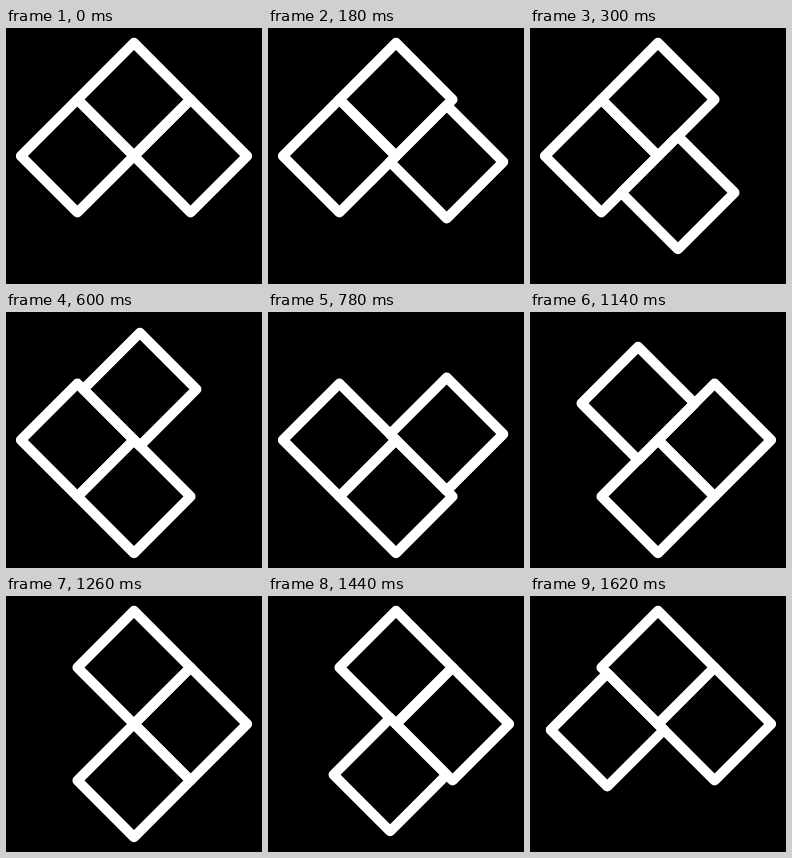
Write an HTML page with a canvas that moves like this. It is 256 px wide and 256 px high and loops after 1.68 s.

```html
<!DOCTYPE html>
<html lang="en">
<head>
<meta charset="utf-8">
<title>Sliding squares</title>
<style>
  html, body { margin: 0; width: 100%; height: 100%; overflow: hidden; background: #000; }
  canvas { display: block; width: 256px; height: 256px; }
</style>
</head>
<body>
<canvas id="stage" width="256" height="256"></canvas>
<script>
const ctx = document.getElementById('stage').getContext('2d');

const SIDE = 80;
const LOOP = 1680;   // ms
const STEP = 60;
const PHASE = 420;   // one square moves per phase
const REST = 120;    // pause before each move
const MOVE = 300;

// Slots on a 2x2 grid, which is turned by 45 degrees when drawn
const TOP = [-1, -1], RIGHT = [0, -1], BOTTOM = [0, 0], LEFT = [-1, 0];

// Each phase: two resting squares, then the start and end of the moving one
const phases = [
  [TOP, LEFT, RIGHT, BOTTOM],
  [LEFT, BOTTOM, TOP, RIGHT],
  [BOTTOM, RIGHT, LEFT, TOP],
  [RIGHT, TOP, BOTTOM, LEFT]
];

const smooth = t => t * t * (3 - 2 * t);
const mix = (a, b, t) => a + (b - a) * t;

function square([x, y]) {
  ctx.strokeRect(x * SIDE, y * SIDE, SIDE, SIDE);
}

function draw(time) {
  const t = Math.floor((time % LOOP) / STEP) * STEP;
  // A move ends exactly on the phase boundary, where the next rest begins
  const [a, b, from, to] = phases[Math.floor(t / PHASE)];
  const k = smooth(Math.max(0, (t % PHASE - REST) / MOVE));

  ctx.setTransform(1, 0, 0, 1, 0, 0);
  ctx.fillStyle = '#000';
  ctx.fillRect(0, 0, 256, 256);

  ctx.translate(128, 128);
  ctx.rotate(Math.PI / 4);
  ctx.strokeStyle = '#fff';
  ctx.lineWidth = 10;
  ctx.lineJoin = 'round';
  square(a);
  square(b);
  square([mix(from[0], to[0], k), mix(from[1], to[1], k)]);
}

const start = performance.now();

function tick() {
  draw(performance.now() - start);
  requestAnimationFrame(tick);
}

tick();
</script>
</body>
</html>
```
